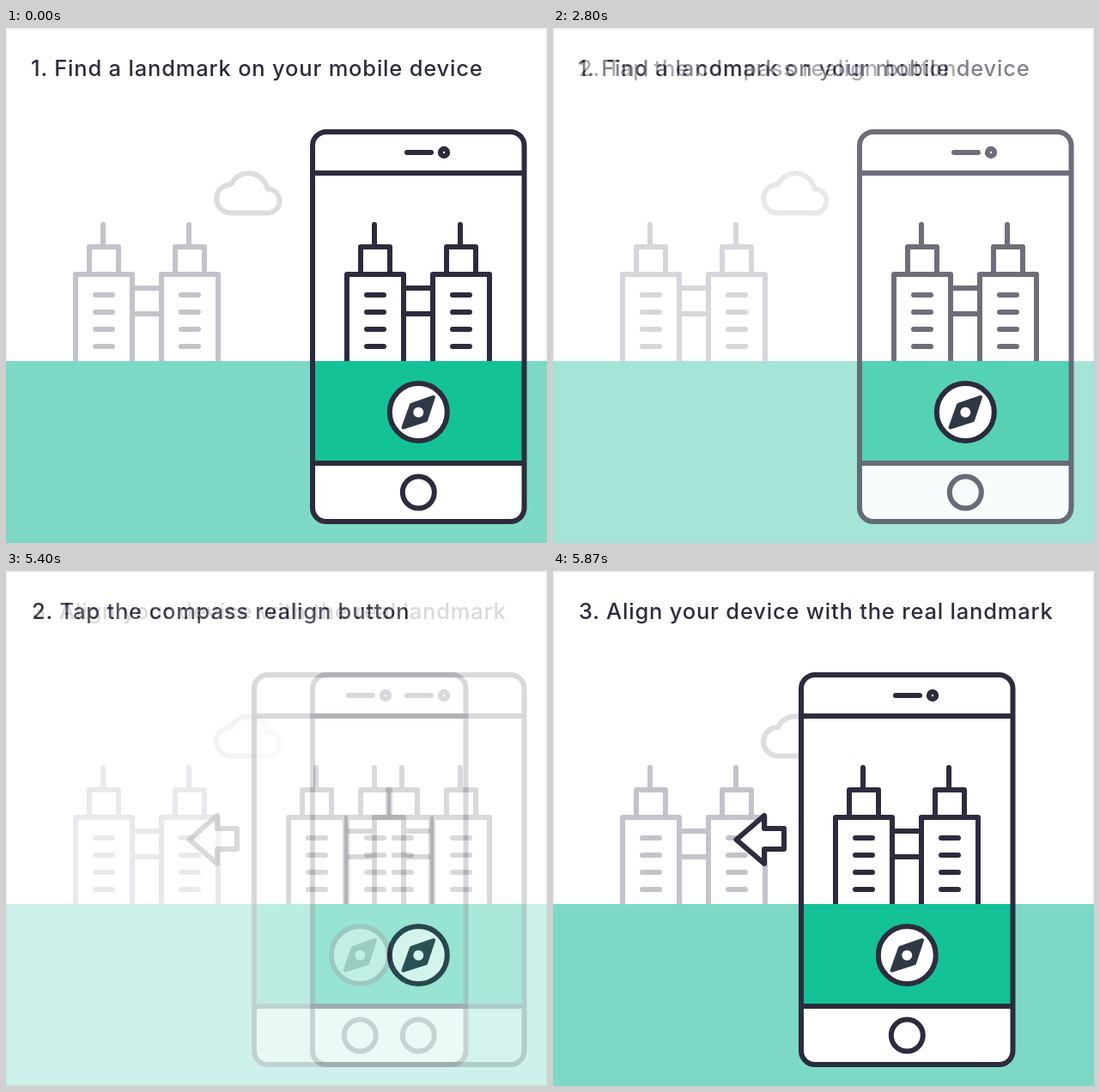
These frames come from a looping animation (630x600 px, 8000 ms). An HTML page:

```html
<!DOCTYPE html>
<html lang="en">
<head>
<meta charset="utf-8">
<title>Align your device</title>
<style>
  html, body { margin: 0; width: 100%; height: 100%; overflow: hidden; background: #fff; }
  svg { display: block; width: 100%; height: 100%; }
  .line { fill: none; stroke-width: 6; stroke-linejoin: round; }
  .round { stroke-linecap: round; }
  .ink { stroke: #2d2c3e; }
  text {
    font: 500 25.5px Inter, sans-serif;
    font-optical-sizing: none;
    letter-spacing: .8px;
    fill: #2d2c3e;
  }
</style>
</head>
<body>
<svg id="stage" viewBox="0 0 630 600" xmlns="http://www.w3.org/2000/svg">
  <defs>
    <g id="tower">
      <path d="M81 388V287H147V388M97 287V255H131V287"/>
      <path class="round" d="M113 255V229M104 311H124M104 331H124M104 351H124M104 371H124"/>
    </g>
    <g id="towers" class="line">
      <path d="M147 303H181M147 333H181"/>
      <use href="#tower"/>
      <use href="#tower" x="100"/>
    </g>

    <g id="paper">
      <rect width="630" height="600" fill="#fff"/>
      <rect x="1" y="1" width="628" height="598" fill="none" stroke="#f3f3f3" stroke-width="2"/>
    </g>

    <g id="land">
      <path class="line" stroke="#ddd" d="M261.5 215.5A16.5 16.5 0 0 1 262 182.3A22.5 22.5 0 0 1 304.5 187.5A14 14 0 0 1 304.5 215.5Z"/>
      <use href="#towers" stroke="#c4c3cc"/>
      <rect y="388" width="630" height="212" fill="#7dd9c6"/>
    </g>

    <g id="phone" class="ink">
      <rect x="357" y="121" width="246.5" height="454" rx="16" fill="#fff" stroke="none"/>
      <use href="#towers" x="316"/>
      <rect x="357" y="388" width="246" height="119" fill="#13c296" stroke="none"/>
      <g class="line">
        <rect x="357" y="121" width="246.5" height="454" rx="16"/>
        <path d="M357 169H603M357 507H603"/>
        <path class="round" d="M467 145H495"/>
        <circle cx="510" cy="145" r="4.2"/>
        <circle cx="480.3" cy="541" r="18.5"/>
      </g>
    </g>

    <g id="compass">
      <circle cx="480.3" cy="447.5" r="33.5" fill="#fff" class="ink" stroke-width="6"/>
      <path d="M472 439L498 430L489 457L462.5 465.5Z" fill="#303845" stroke="#303845" stroke-width="4" stroke-linejoin="round"/>
      <circle cx="480.3" cy="447.7" r="6" fill="#fff"/>
    </g>
  </defs>

  <g>
    <use href="#paper"/>
    <use href="#land"/>
    <use href="#phone"/>
    <use href="#compass"/>
    <text x="29" y="56">1. Find a landmark on your mobile device</text>
  </g>

  <g id="tap">
    <use href="#paper"/>
    <use href="#land" opacity=".22"/>
    <use href="#phone" opacity=".22"/>
    <use href="#compass"/>
    <text x="30" y="56">2. Tap the compass realign button</text>
  </g>

  <g id="align">
    <use href="#paper"/>
    <use href="#land"/>
    <g transform="translate(-68)">
      <use href="#phone"/>
      <use href="#compass"/>
    </g>
    <path class="line ink" style="fill:#fff" d="M213.5 313L246 285V300H269V324H246V341Z"/>
    <text x="30" y="56">3. Align your device with the real landmark</text>
  </g>
</svg>
<script>
  const LOOP = 8000, STEP = 67;
  const scenes = [
    { node: document.getElementById('tap'), start: 2729 },
    { node: document.getElementById('align'), start: 5399 }
  ];

  // Stepped linear cross-fade over the scene below.
  function fade(t, start) {
    if (t < start) return 0;
    return Math.min(1, 0.18 + 0.225 * Math.floor((t - start) / STEP));
  }

  function draw(t) {
    for (const { node, start } of scenes) {
      const alpha = fade(t, start);
      node.setAttribute('opacity', alpha);
      node.setAttribute('visibility', alpha ? 'visible' : 'hidden');
    }
  }

  const origin = performance.now();
  function tick() {
    draw((performance.now() - origin) % LOOP);
    requestAnimationFrame(tick);
  }
  draw(0);
  requestAnimationFrame(tick);
</script>
</body>
</html>
```
